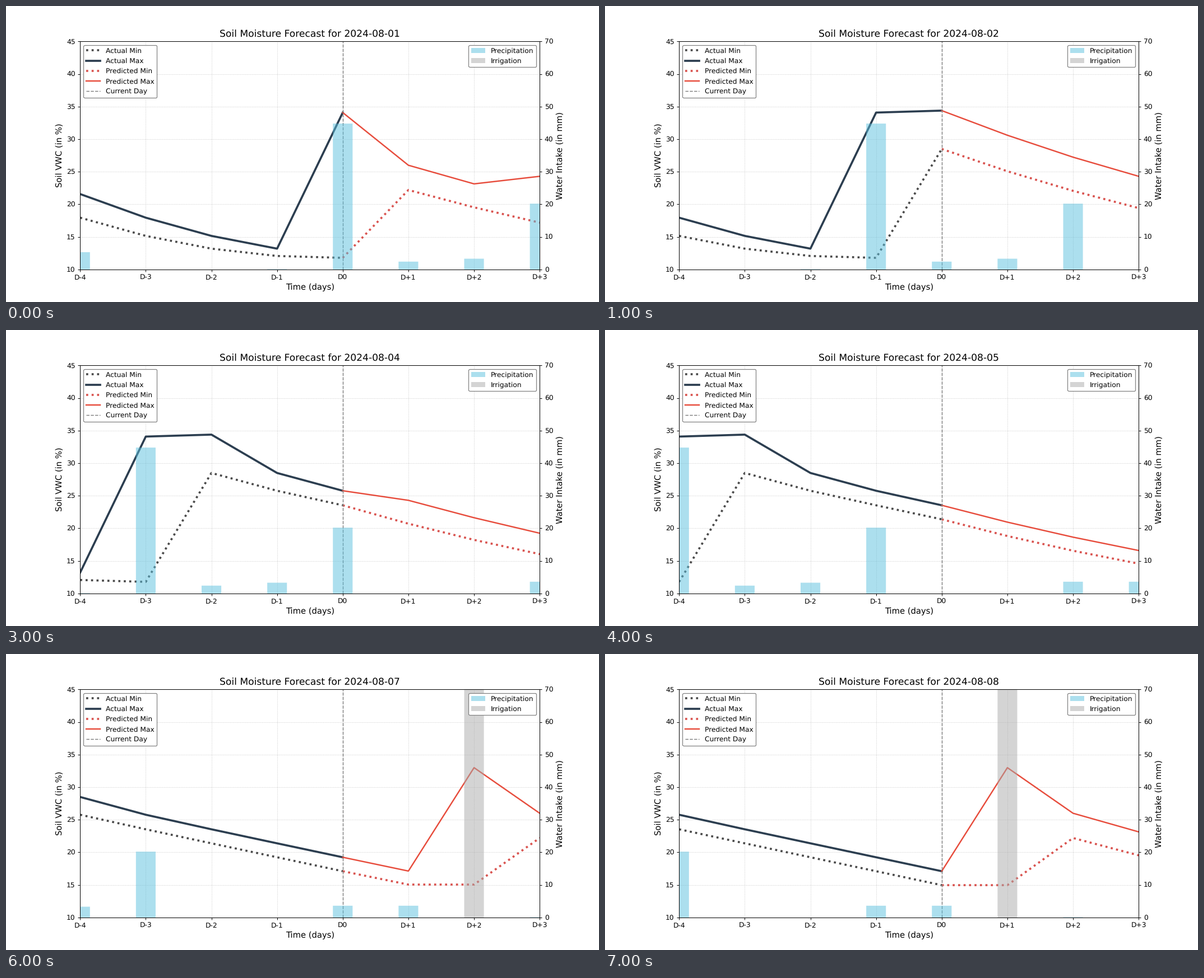
A matplotlib script for the animation above (8 s loop, 1058 by 529 pixels).

```python
import numpy as np
import matplotlib.pyplot as plt
from matplotlib.animation import FuncAnimation

plt.rcParams.update({"font.family": "DejaVu Sans", "text.hinting": "none"})

PAST, AHEAD, DAYS = 4, 3, 8
OFFSETS = np.arange(-PAST, AHEAD + 1)
SOAKING, FLOODING = 15, 40

# Water in mm; day 0 lies four days before the first forecast.
RAIN = {0: 5.3, 3: 0.1, 4: 44.8, 5: 2.4, 6: 3.3, 7: 20.2,
        10: 3.6, 11: 3.6, 13: 0.1}
IRRIGATION = {12: 70}

# Two drying spells, parted by the heavy rain; the minimum runs a day ahead.
spell = np.arange(8)
before = 21.58 - 4.05 * spell[:6] + 0.418 * spell[:6] ** 2
after = 29.94 - 2.14 * spell + 4.45 * np.exp(-1.85 * spell)
ACTUAL_MAX = np.concatenate([before[:4], [34.09], after[:-1]])
ACTUAL_MIN = np.concatenate([before[1:], after[1:]])


def intake(day):
    return RAIN.get(day, 0) + IRRIGATION.get(day, 0)


def forecast(today):
    """Dry the soil day by day, refilling it where water arrives."""
    low, high = ACTUAL_MIN[today], ACTUAL_MAX[today]
    path = [(low, high)]
    for day in range(today + 1, today + AHEAD + 1):
        now, previous = intake(day), intake(day - 1)
        if now >= FLOODING:
            high = 33
        elif previous >= FLOODING:
            low, high = 22.2, 26
        else:
            low, high = 0.88 * low, 0.89 * high
            if max(now, previous) >= SOAKING:
                high = max(high, 24.3)
        path.append((low, high))
    return zip(*path)


fig, soil = plt.subplots(figsize=(12, 6), dpi=88.1667)
water = soil.twinx()


def soil_line(label, color, width, style="-"):
    return soil.plot([], [], color=color, lw=width, ls=style, label=label)[0]


def water_bars(label, color):
    return water.bar(OFFSETS, np.zeros(len(OFFSETS)), width=0.3,
                     color=color, alpha=0.5, label=label, snap=False)


actual_min = soil_line("Actual Min", "#4a4a4a", 3, ":")
actual_max = soil_line("Actual Max", "#2c3e50", 3)
predicted_min = soil_line("Predicted Min", "#d9534f", 3, ":")
predicted_max = soil_line("Predicted Max", "#e74c3c", 2)
soil.axvline(0, color="gray", ls="--", lw=1.2, label="Current Day")
rain_bars = water_bars("Precipitation", "#5bc0de")
irrigation_bars = water_bars("Irrigation", "#aaaaaa")

soil.set(xlim=(-PAST, AHEAD), ylim=(10, 45))
soil.set_xticks(OFFSETS, ["D0" if d == 0 else f"D{d:+d}" for d in OFFSETS])
soil.set_xlabel("Time (days)", fontsize=12)
soil.set_ylabel("Soil VWC (in %)", fontsize=12)
soil.grid(True, ls=":", lw=0.8, alpha=0.7)
water.set_ylim(0, 70)
water.set_ylabel("Water Intake (in mm)", fontsize=12)
title = soil.set_title("", fontsize=14)
for axes, corner in ((soil, "upper left"), (water, "upper right")):
    axes.legend(loc=corner, fontsize=10, framealpha=1, edgecolor="gray",
                labelspacing=0.54)


def update(start):
    today = start + PAST
    for line, values in ((actual_min, ACTUAL_MIN), (actual_max, ACTUAL_MAX)):
        line.set_data(OFFSETS[:PAST + 1], values[start:today + 1])
    for line, values in zip((predicted_min, predicted_max), forecast(today)):
        line.set_data(OFFSETS[PAST:], values)
    for bars, amounts in ((rain_bars, RAIN), (irrigation_bars, IRRIGATION)):
        for day, bar in enumerate(bars, start):
            bar.set_height(amounts.get(day, 0))
    title.set_text(f"Soil Moisture Forecast for 2024-08-{start + 1:02d}")
    return ()


animation = FuncAnimation(fig, update, frames=DAYS, interval=1000,
                          repeat=True, repeat_delay=0)
plt.show()
```
